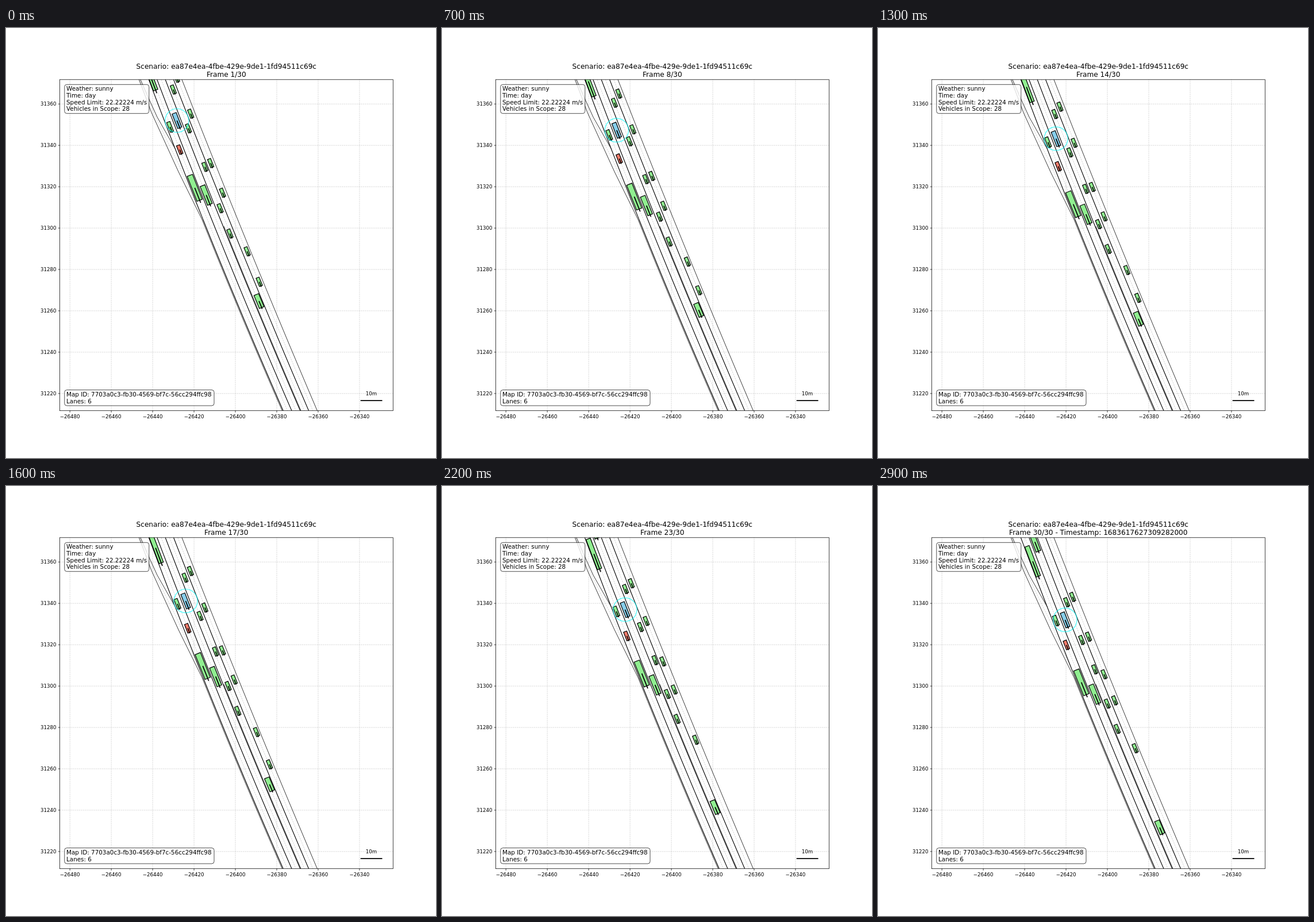
Write an HTML page that moves like this. It is 748 px wide and 748 px high and loops after 3 s.

```html
<!DOCTYPE html>
<html lang="en">
<head>
<meta charset="utf-8">
<title>Traffic scenario</title>
<style>
html, body { margin: 0; width: 100%; height: 100%; overflow: hidden; background: #fff; }
svg { display: block; width: 748px; height: 748px; font-family: "DejaVu Sans", sans-serif; }
.tick { font-size: 8.66px; }
.title { font-size: 12.12px; }
.note { font-size: 10.39px; }
.grid { stroke: #b0b0b0; stroke-width: .7; stroke-opacity: .65; stroke-dasharray: 2.56 1.1; }
.axis { stroke: #000; stroke-width: .75; fill: none; }
.lane { stroke: #000; fill: none; stroke-width: 1.1; }
.thin { stroke: #222; fill: none; stroke-width: .9; }
.mid { stroke: #999; fill: none; stroke-width: .6; stroke-dasharray: 2.6 1.4; stroke-opacity: .75; }
.car { stroke: #000; stroke-width: 1.25; }
.car line { stroke-width: 1.7; }
.box { fill: #fff; stroke: #000; stroke-width: .87; opacity: .8; }
.scale { stroke: #000; stroke-width: 1.75; }
</style>
</head>
<body>
<svg viewBox="0 0 748 748">
  <defs><clipPath id="plot"><rect x="93.6" y="89.8" width="579.7" height="575.9"/></clipPath></defs>
  <g id="grid"></g>
  <g clip-path="url(#plot)">
    <g id="road"></g>
    <g id="cars"></g>
    <circle id="ring" r="20.6" fill="none" stroke="#0ff" stroke-width="1.4" stroke-opacity=".65"/>
  </g>
  <rect class="axis" x="93.6" y="89.8" width="579.7" height="575.9"/>
  <g id="labels"></g>
</svg>
<script>
const TOP = 90, BOTTOM = 666, STEPS = 30, STEP_MS = 100;
const $ = id => document.getElementById(id);

function add(parent, tag, attrs, text) {
  const el = document.createElementNS("http://www.w3.org/2000/svg", tag);
  for (const key in attrs) el.setAttribute(key, attrs[key]);
  if (text) el.textContent = text;
  parent.appendChild(el);
  return el;
}
const line = (g, cls, x1, y1, x2, y2) => add(g, "line", { class: cls, x1, y1, x2, y2 });
const text = (cls, x, y, str, anchor = "start") =>
  add($("labels"), "text", { class: cls, x, y, "text-anchor": anchor }, str);

// Axes
for (let i = 0; i < 8; i++) {
  const x = 111.2 + 71.96 * i, y = 132.2 + 71.95 * i;
  line($("grid"), "grid", x, 665.7, x, 89.8);
  line($("grid"), "grid", 93.6, y, 673.3, y);
  line($("labels"), "axis", x, 665.7, x, 668.8);
  line($("labels"), "axis", 90.6, y, 93.6, y);
  text("tick", x, 679.2, "\u2212" + (26480 - 20 * i), "middle");
  text("tick", 87.5, y + 3.2, 31360 - 20 * i, "end");
}

// Road: edges are k = 0..4 from left to right, lane centres lie at k + .5
function roadX(k, y) {
  const u = (y - TOP) / (BOTTOM - TOP);
  return 248.5 + 14.4 * k + (233.8 + .4 * k) * u - (18 - 2 * k) * u * (1 - u);
}
const path = (cls, d) => add($("road"), "path", { class: cls, d });
function along(k, from = TOP, shift = 0) {
  const points = [];
  for (let i = 0; i <= 24; i++) {
    const y = from + (BOTTOM - from) * i / 24;
    points.push(`${(roadX(k, y) + shift).toFixed(2)} ${y}`);
  }
  return points.join("L");
}
for (let k = 0; k <= 4; k++) {
  if (k) path("mid", "M" + along(k - .5));
  path(k == 4 ? "thin" : "lane", "M" + along(k));
}
path("thin", "M" + along(2, 345, 1.3));
path("thin", "M231.5 90L253 147L300 250L" + along(0, 333, -1.8));
path("thin", "M234 90L248 122L263 155L" + roadX(0, 210) + " 210");
path("mid", "M233 90L258 151L296 228L" + roadX(0, 333) + " 333");

// Vehicles: lane position, start height, speed per step, bend of the speed curve
const KINDS = {
  car: [15.5, 5.7, "#90ee90"],
  suv: [18, 6, "#90ee90"],
  red: [16, 6, "#f27c6c"],
  van: [27.1, 7.6, "#87ceeb"],
  bus: [24.6, 8.7, "#90ee90"],
  lorry: [34.9, 8.8, "#90ee90"],
  truck: [46.5, 10, "#90ee90"],
  trailer: [55.8, 8, "#90ee90"]
};
const cars = [];
function vehicle(kind, lane, y, speed, bend = 0, surge = null, last = STEPS) {
  const [l, w, fill] = KINDS[kind];
  const el = add($("cars"), "g", { class: "car" });
  add(el, "rect", { x: -w / 2, y: -l / 2, width: w, height: l, fill });
  line(el, "", 0, 0, 0, l * .6);
  cars.push({ el, kind, lane, y, speed, bend, surge, last });
}
vehicle("trailer", .35, 82, 1.69, -.12);
vehicle("suv", .4, 172, 2.14, -.08);
vehicle("red", .5, 211.5, 2.24);
vehicle("truck", .5, 278, 2.19);
vehicle("lorry", 1.5, 3, 3.25);
vehicle("lorry", 1.5, 290.5, 2.47, .08);
vehicle("car", 2.5, 107, 3.28);
vehicle("car", 2.5, 174.5, 3.22);
vehicle("car", 2.65, 241.5, 2.67, .19);
vehicle("car", 2.5, 313.5, 2.24, -.09);
vehicle("car", 2.45, 357.5, 2.24, -.14);
vehicle("car", 3.45, 86.5, 3.67, .1);
vehicle("car", 3.45, 149, 3.9);
vehicle("car", 3.5, 235, 3.19);
vehicle("car", 3.5, 286.5, 2.98, .12);
vehicle("car", 3.6, 388.5, 2.33, .13);
vehicle("car", 3.55, 441.5, 2.1, 0, { from: 10, to: 19, size: 46, power: 4 }, 21);
vehicle("bus", 2.6, 475, 2.2, 0, { from: 10, to: 25, size: 55, power: 2 });
vehicle("van", 1.5, 161, 2.48, -.04);

function heightOf({ y, speed, bend, surge }, step) {
  y += speed * step * (1 + bend * (1 - step / (STEPS - 1)));
  if (surge) {
    const u = (step - surge.from) / (surge.to - surge.from);
    y += surge.size * Math.min(1, Math.max(0, u)) ** surge.power;
  }
  return y;
}

// Captions
text("title", 383.3, 70.8, "Scenario: ea87e4ea-4fbe-429e-9de1-1fd94511c69c", "middle");
const caption = text("title", 383.3, 84.7, "Frame 1/30", "middle");
function note(y, w, h, base, rows) {
  add($("labels"), "rect", { class: "box", x: 101.8, y, width: w, height: h, rx: 4 });
  rows.forEach((row, i) => text("note", 105, base + 11.67 * i, row));
}
note(98.3, 147, 50.4, 109.2, ["Weather: sunny", "Time: day", "Speed Limit: 22.22224 m/s", "Vehicles in Scope: 28"]);
note(629.6, 260.2, 27.4, 640.9, ["Map ID: 7703a0c3-fb30-4569-bf7c-56cc294ffc98", "Lanes: 6"]);
text("tick", 635.6, 638.8, "10m", "middle");
line($("labels"), "scale", 616.7, 648, 654.5, 648);

let shown = -1;
function draw() {
  const step = Math.floor(performance.now() / STEP_MS) % STEPS;
  if (step != shown) {
    shown = step;
    for (const car of cars) {
      const y = heightOf(car, step), x = roadX(car.lane, y);
      const turn = Math.atan2(x - roadX(car.lane, y + 1), 1) * 180 / Math.PI;
      car.el.style.display = step > car.last ? "none" : "";
      car.el.setAttribute("transform", `translate(${x} ${y}) rotate(${turn})`);
      if (car.kind == "van") $("ring").setAttribute("transform", `translate(${x} ${y})`);
    }
    caption.textContent = `Frame ${step + 1}/${STEPS}` +
      (step == STEPS - 1 ? " - Timestamp: 1683617627309282000" : "");
  }
  requestAnimationFrame(draw);
}
draw();
</script>
</body>
</html>
```
